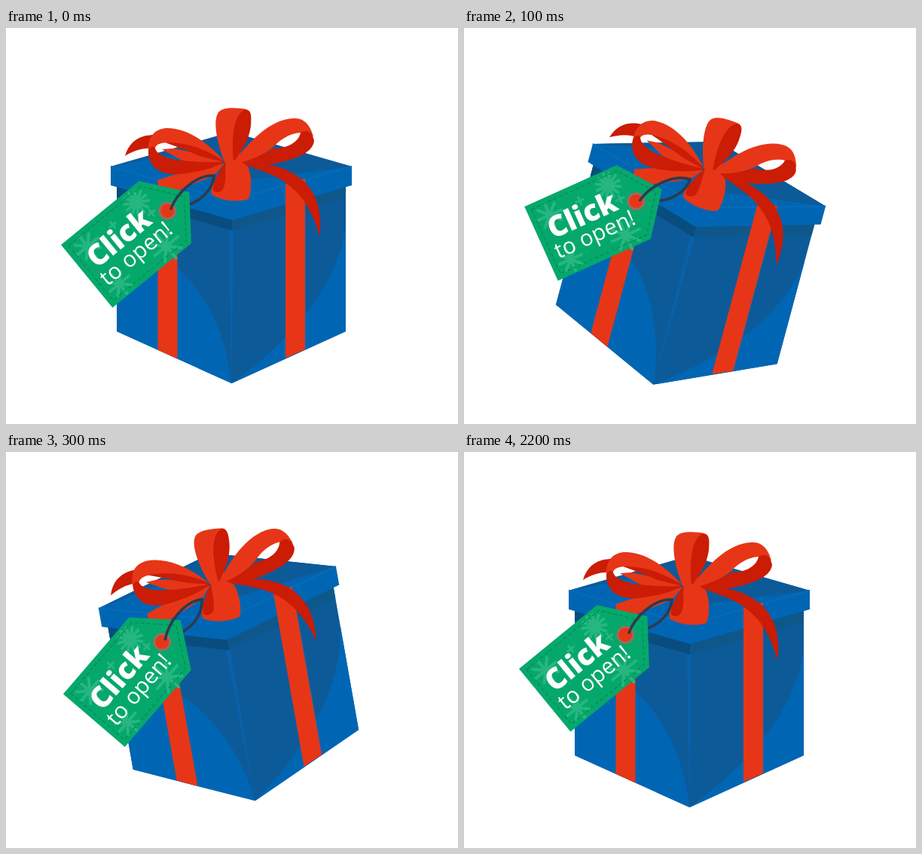
These frames come from a looping animation (600 px wide and 526 px high, 3400 ms). An HTML page:

```html
<!DOCTYPE html>
<html lang="en">
<head>
<meta charset="utf-8">
<title>Gift box</title>
<style>
  html, body { margin: 0; width: 100%; height: 100%; overflow: hidden; background: #fff; }
  svg { display: block; width: 100vw; height: 100vh; }
  text { font-family: "Open Sans", "Noto Sans", sans-serif; fill: #fff; }
  .blue { fill: #0066b3; }
  .navy { fill: #0d5a99; }
  .red { fill: #e63617; }
  .dark { fill: #cb1c05; }
  .cord { fill: none; stroke: #2d3b4c; stroke-width: 3.6; stroke-linecap: round; }
</style>
</head>
<body>
<svg viewBox="0 0 600 526">
  <g id="gift">
    <!-- box -->
    <path class="navy" d="M147 205L300 250L451 205V403L299.500 472L147 403Z"/>
    <path class="blue" d="M147 205H160C170 270 200 295 229 320C268 355 292 410 299.500 472L147 403Z"/>
    <path class="blue" d="M451 262V403L299.500 472C372 420 440 348 451 262Z"/>
    <path d="M296 266H302L299.500 472Z" fill="#0862ab"/>
    <path d="M147 208L300 252V269L147 225Z" fill="#084d7e"/>
    <path d="M300 252L451 208V226L300 269Z" fill="#0d578b"/>
    <path class="red" d="M201.500 202L227.500 208V439.500L201.500 427.500Z"/>

    <!-- lid -->
    <path class="blue" d="M139 184L299 138L459 184V209L300 255L139 209Z"/>
    <path class="navy" d="M139 184L299 138L459 184L320 202L240 165Z"/>
    <path d="M139 184L299 229L459 184" fill="none" stroke="#086bb5" stroke-width="2"/>
    <path class="red" d="M201.500 202C230 192 260 184 290 180L276 196L227.500 216V240H201.500Z"/>
    <path class="red" d="M371 207L397 200V427L371 438.500Z"/>
    <path d="M397 235V427" stroke="#715475" stroke-width="1"/>

    <!-- bow -->
    <path class="dark" d="M158 170C164 150 178 142 197 142L195 160C180 159 168 164 158 170Z"/>
    <path class="red" d="M207 161L222 160C245 164 265 170 288 178C265 181 244 179 232 175Z"/>
    <path class="dark" d="M310 179C352 176 428 190 416 277C408 245 394 222 372 206C354 193 332 187 310 179Z"/>
    <path class="dark" d="M288 178C262 155 230 147 208 151C228 158 252 168 288 178Z"/>
    <path class="red" d="M290 177C268 152 240 132 212 133C192 135 186 152 190 172L198 159C205 143 260 157 290 177Z"/>
    <path class="dark" d="M227 153C250 155 272 165 290 177C265 174 243 167 227 153Z"/>
    <path class="dark" d="M189 165C190 190 212 196 232 194C255 191 275 187 290 178C250 179 203 177 198 160C196 156 190 157 189 165Z"/>
    <path class="red" d="M301 181C320 153 350 121 382 120C398 119 405 133 408 144L391 139C375 140 362 150 355 158C342 168 326 177 310 181Z"/>
    <path class="dark" d="M391 139C400 134 407 138 409 150C407 165 388 172 370 177C350 183 326 184 309 179C325 176 340 168 355 160C372 160 388 153 391 139Z"/>
    <path class="red" d="M292 182C282 160 274 126 281 114C285 104 308 106 319 108L310 176Z"/>
    <path class="dark" d="M318 108C326 109 326 117 325 130C322 152 312 163 302 179C299 145 302 114 318 108Z"/>
    <path class="red" d="M291 178C287 194 270 207 273 221C285 230 310 232 322 227C327 215 326 194 321 184C312 175 298 174 291 178Z"/>
    <path class="dark" d="M292 177C280 194 274 206 275 216C280 220 287 218 289 212C293 201 290 190 292 177Z"/>

    <!-- tag -->
    <path class="cord" d="M276 196C275 211 262 230 238 236"/>
    <g transform="translate(73 288) rotate(-39.300)">
      <path d="M0 0H134L176 54L135 108H0Z" fill="#05a86b"/>
      <g id="flakes" stroke="#27b681" stroke-linecap="round"></g>
      <path d="M7 7H131L167 54L132 101H7Z" fill="none" stroke="#078957" stroke-width="1.300" stroke-dasharray="5 3"/>
      <text x="16.500" y="55" font-size="39" font-weight="800">Click</text>
      <text x="12.500" y="82" font-size="29.500">to open!</text>
      <circle cx="138" cy="54.500" r="12" fill="#9a6c5d"/>
      <circle class="red" cx="138" cy="54.500" r="9"/>
    </g>
    <path class="cord" d="M219 240C226 221 250 195 276 196"/>
  </g>
</svg>
<script>
const gift = document.getElementById("gift");
const flakes = document.getElementById("flakes");

// x, y, radius and number of arms, in tag coordinates
const stars = [[113, 20, 16, 12], [26, 24, 17, 8], [107, 90, 20, 8],
               [27, 89, 16, 8], [70, 23, 5, 4], [120, 43, 5, 4]];

for (const [x, y, r, arms] of stars) {
  let d = "";
  for (let i = 0; i < arms; i++) {
    const a = i * 2 * Math.PI / arms, c = Math.cos(a), s = Math.sin(a);
    d += `M${x + c * r * 0.35} ${y + s * r * 0.35}L${x + c * r} ${y + s * r}`;
  }
  flakes.insertAdjacentHTML("beforeend",
    `<path d="${d}" stroke-width="${r > 10 ? 4 : 3}"/>` +
    `<circle cx="${x}" cy="${y}" r="${r * 0.35}" fill="#27b681" stroke="none"/>`);
}

// The box jolts right, rests, jolts left, then waits.
const poses = ["", "translate(84.3 -59.8) rotate(15)", "", "translate(-46 50.5) rotate(-10)"];
const start = performance.now();

function draw() {
  const t = Math.max(0, performance.now() - start) % 3400;
  gift.setAttribute("transform", poses[Math.floor(t / 100)] || "");
  requestAnimationFrame(draw);
}
draw();
</script>
</body>
</html>
```
